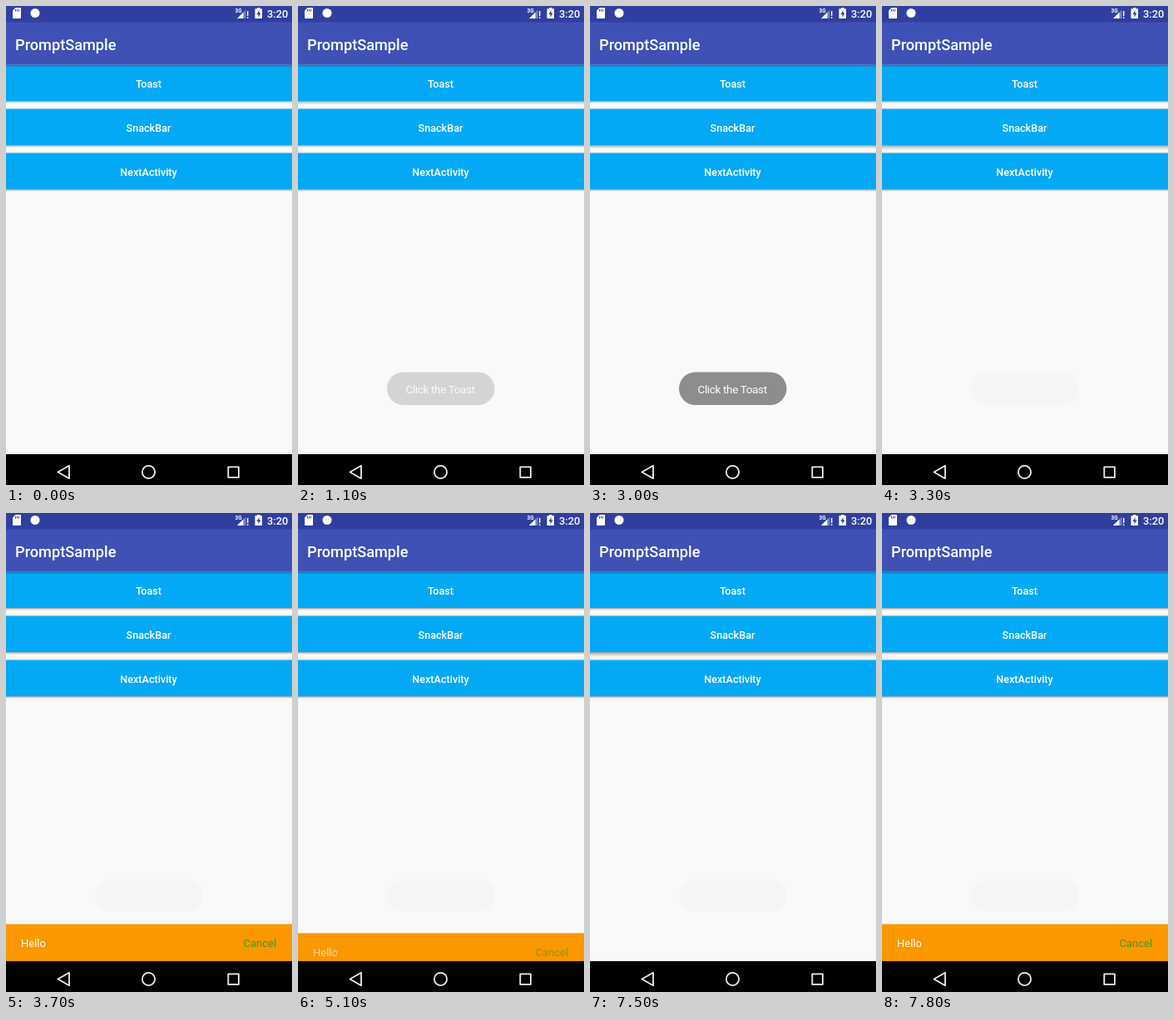
An HTML page that plays this animation: 344 px wide and 575 px high, repeating every 8000 ms.

```html
<!DOCTYPE html>
<html lang="en">
<head>
<meta charset="utf-8">
<title>Toast and snackbar</title>
<style>
  html, body { margin: 0; width: 100%; height: 100%; overflow: hidden; background: #f9f9f9; }
  svg { display: block; width: 100%; height: 100%; }
  text { font-family: Roboto, sans-serif; fill: #fff; }
  .label { font-size: 12.6px; font-weight: 500; text-anchor: middle; }
  .note { font-size: 13px; }
</style>
</head>
<body>
<svg viewBox="0 0 344 575" xmlns="http://www.w3.org/2000/svg">
  <defs>
    <linearGradient id="below" x1="0" y1="0" x2="0" y2="1">
      <stop offset="0" stop-color="#000" stop-opacity=".4"/>
      <stop offset=".4" stop-color="#000" stop-opacity=".17"/>
      <stop offset="1" stop-color="#000" stop-opacity="0"/>
    </linearGradient>
  </defs>
  <rect width="344" height="575" fill="#f9f9f9"/>

  <g id="buttons"></g>

  <!-- app bar -->
  <rect y="70.5" width="344" height="3" fill="url(#below)"/>
  <rect y="19" width="344" height="51.5" fill="#3f51b5"/>
  <text x="11" y="52.5" font-size="18.2" font-weight="500">PromptSample</text>

  <!-- status bar -->
  <rect width="344" height="19.5" fill="#303f9f"/>
  <g fill="#fff">
    <path d="M11.5 2H17q1 0 1 1V14q0 1-1 1H9q-1 0-1-1V5.5Z"/>
    <path d="M11.5 4v2.5M13.5 4v2.5M15.5 4v2.5" stroke="#303f9f"/>
    <circle cx="35" cy="8.5" r="5.5"/>
    <text x="275.5" y="7.5" font-size="6.5" font-weight="700">3G</text>
    <path d="M278 15 288.5 4.5V15Z" fill-opacity=".35"/>
    <path d="M278 15 285.5 7.5V15Z"/>
    <path d="M290 6h1.4v6H290zM290 13.3h1.4V15H290z"/>
    <path d="M302 2h3.5v1.3h2.5V15h-8.500V3.300h2.500Z"/>
    <path d="M304.600 5 301.500 10h2v3.500L306.500 8.500h-2Z" fill="#303f9f"/>
    <text x="314" y="14" font-size="12.8" font-weight="500">3:20</text>
  </g>

  <g id="toast">
    <rect x="107" y="439.500" width="129.500" height="39.500" rx="19.750" fill="#6a6a6a"/>
    <text x="129.500" y="464.500" font-size="13.500" letter-spacing="-.35">Click the Toast</text>
  </g>

  <g id="snack">
    <rect y="493.500" width="344" height="45" fill="#fb9800"/>
    <g id="notes" class="note">
      <text x="18" y="521">Hello</text>
      <text x="285.500" y="521" style="fill:#3d9a28">Cancel</text>
    </g>
  </g>

  <!-- navigation bar -->
  <rect y="538" width="344" height="37" fill="#000"/>
  <g fill="none" stroke="#eee" stroke-width="1.800" stroke-linejoin="round">
    <path d="M62.500 559.500 76 551.800V567.200Z"/>
    <circle cx="171.500" cy="559.500" r="7.600"/>
    <rect x="267.300" y="553.300" width="12.600" height="12.600"/>
  </g>
</svg>
<script>
const LOOP = 8000, STEP = 100;
const $ = id => document.getElementById(id);
const ramp = (t, a, b) => Math.min(1, Math.max(0, (t - a) / (b - a)));
const ease = x => 1 - (1 - x * x * (3 - 2 * x)) ** 1.3;

const items = [['Toast', 70.5], ['SnackBar', 123.5], ['NextActivity', 176.5]];
$('buttons').innerHTML = items.map(([name, y]) => `
  <rect y="${y - 1}" width="344" height="1" fill="#000" fill-opacity=".1"/>
  <rect class="shade" y="${y + 43.5}" width="344" height="3" fill="url(#below)"/>
  <rect y="${y}" width="344" height="43.5" fill="#03a9f4"/>
  <text class="label" x="171.5" y="${y + 27}">${name}</text>`).join('');
const shades = document.querySelectorAll('.shade');

function press(i, amount) {
  shades[i].setAttribute('height', 3 + 3 * amount);
}

function draw(time) {
  const t = Math.floor(time / STEP) * STEP;

  press(0, ramp(t, 700, 900) - ramp(t, 1000, 1200));
  press(1, ramp(t, 2900, 3100) - ramp(t, 3400, 3600)
         + ramp(t, 7400, 7500) - ramp(t, 7500, 7700));

  // a faint trace of the toast stays behind
  const fade = ramp(t, 1000, 1400) - ramp(t, 2900, 3300);
  $('toast').setAttribute('opacity', t >= 3300 ? 0.018 : fade);

  const rise = (from, f) => f(ramp(t, from, from + 250));
  const shown = rise(3430, ease) - rise(5030, ease) + rise(7530, ease);
  const text = ramp(t, 3500, 3680) - ramp(t, 5030, 5210) + ramp(t, 7600, 7780);
  $('snack').setAttribute('transform', `translate(0 ${(1 - shown) * 45})`);
  $('notes').setAttribute('opacity', text);
}

const start = performance.now();
function tick() {
  draw((performance.now() - start) % LOOP);
  requestAnimationFrame(tick);
}
tick();
</script>
</body>
</html>
```
